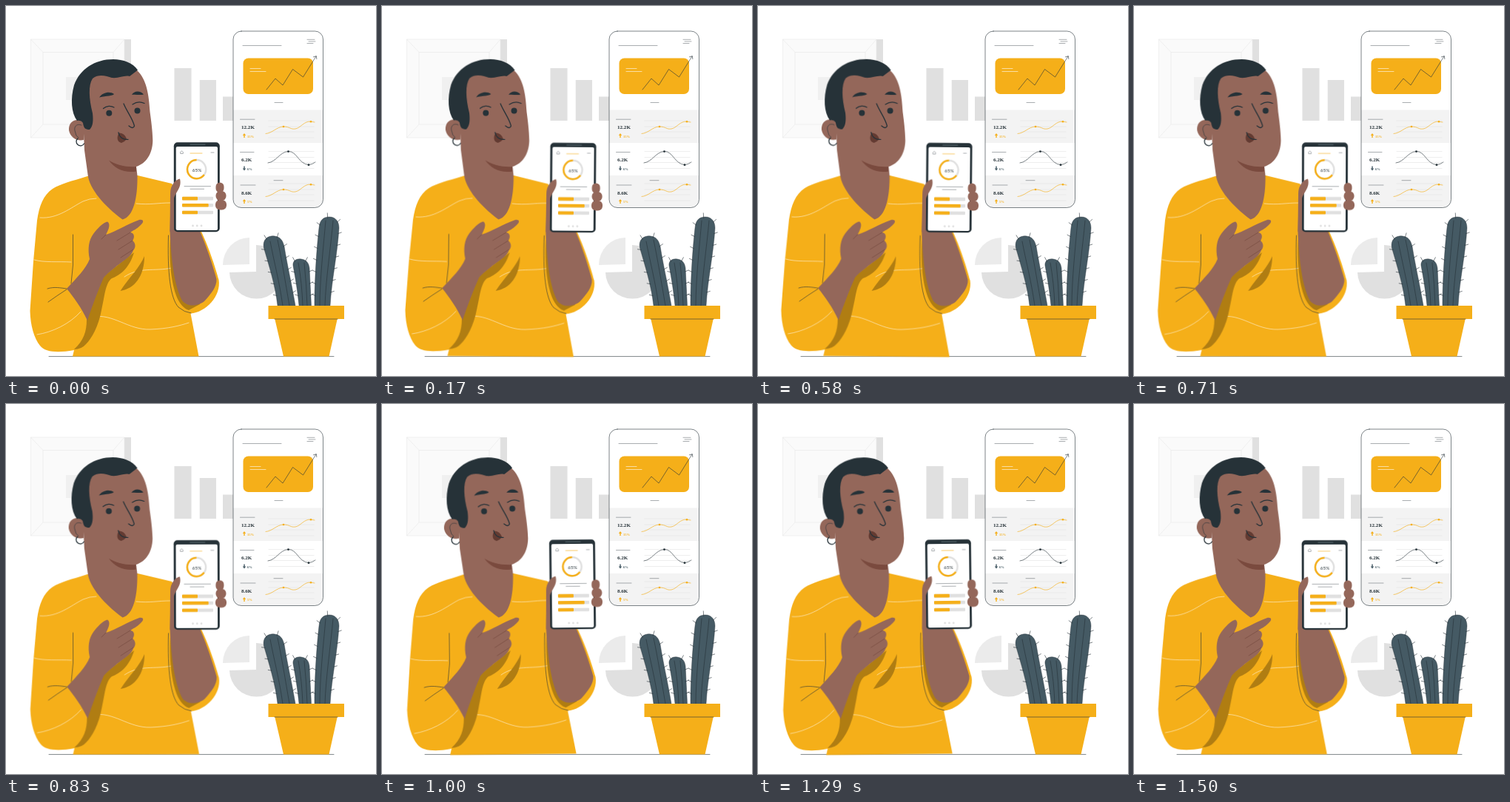
Write an HTML page that moves like this. It is 500 px wide and 500 px high and loops after 1540 ms.

```html
<!DOCTYPE html>
<html lang="en">
<head>
<meta charset="utf-8">
<title>Analytics on a phone</title>
<style>
html, body { margin: 0; width: 100%; height: 100%; overflow: hidden; background: #fff; }
svg { display: block; width: 100vw; height: 100vh; }
.person { transform-origin: 165.5px 273px; animation: sway 1.54s linear infinite; }
@keyframes sway {
  0%, 100% { transform: rotate(0deg); }
  25% { transform: rotate(1deg); }
  75% { transform: rotate(-1deg); }
}
.line { fill: none; stroke-linecap: round; stroke-linejoin: round; }
.ink { fill: #263238; }
.inkLine { stroke: #263238; stroke-width: .6; }
.fine { stroke-width: .4; }
.bold { stroke-width: 1.3; }
.gold { fill: #f5af19; }
.goldLine { stroke: #f5af19; stroke-width: .65; }
.shade { fill: #b07d12; }
.skin { fill: #94675a; }
.grey { fill: #e0e0e0; }
.cactus { fill: #455a64; stroke: #263238; stroke-width: .4; }
.stat { font: bold 7.1px "Liberation Serif", serif; fill: #263238; }
.pct { font: bold 4.5px "Liberation Serif", serif; }
.ring { fill: none; stroke-width: 2.5; }
</style>
</head>
<body>
<svg viewBox="0 0 500 500">
  <defs>
    <clipPath id="card"><rect x="307" y="34" width="121.5" height="238.5" rx="11"/></clipPath>
    <path id="grid" class="line" stroke="#dcdcdc" stroke-width=".5" d="M355 155H416M355 163H416M355 170H416M355 178H416"/>
    <g id="trend">
      <use href="#grid"/>
      <path class="line goldLine" d="M351 172.500C360 172 366 163 375 163S384 167 391 166S403 155 412 156.200L417 157"/>
      <g class="gold"><circle cx="375" cy="163" r="1.300"/><circle cx="412" cy="156.200" r="1.300"/></g>
    </g>
    <path id="arrow" d="M-.7 3V0H-2.200L0-3L2.200 0H.7V3Z"/>
    <rect id="bar" class="grey" x="238" width="42" height="4.600" rx="1"/>
  </defs>

  <!-- wall -->
  <g stroke="#e8e8e8" stroke-width=".6">
    <rect x="160" y="45" width="9" height="133" fill="#e0e0e0" stroke="none"/>
    <rect x="33.500" y="45" width="126.500" height="133" fill="#fafafa"/>
    <rect x="50" y="62.500" width="95" height="97.500" fill="#fafafa"/>
    <path d="M33.500 45L50 62.500M160 45L145 62.500M33.500 178L50 160M160 178L145 160"/>
    <rect x="81" y="96" width="32" height="31" fill="#f0f0f0" stroke="none"/>
  </g>
  <path class="grey" d="M227.500 84H250.500V155H227.500ZM261.700 100H284V155H261.700ZM293 122.500H315V155H293Z"/>
  <path fill="#ebebeb" d="M329 313A36 37 0 0 0 293 350L329 349Z"/>
  <path class="grey" d="M338 323A36.300 36.300 0 1 1 302 360L338 359Z"/>

  <!-- report screen -->
  <g clip-path="url(#card)">
    <rect x="307" y="34" width="122" height="239" fill="#fff"/>
    <path fill="#f3f3f3" d="M307 140.500H429V185H307ZM307 229H429V273H307Z"/>
  </g>
  <rect class="line inkLine" x="307" y="34" width="121.500" height="238.500" rx="11"/>
  <path class="line inkLine fine" d="M320 53.500H372M407 45.300H417M409 47.900H418M407 50.500H415M363 130.500H374M316.500 153.200H336M316.500 197.500H335M317 242H337M362 235.700H374"/>
  <rect class="gold" x="320.500" y="70.500" width="94.500" height="48.500" rx="7"/>
  <path class="line" stroke="#fff" stroke-width=".6" d="M330 84.500H344M330 88.500H351"/>
  <path class="line inkLine" d="M352 113L364 98L374 107L387.500 85.500L401.500 96L419 68M415.500 68.800L419.300 67.700L419.800 71.500"/>
  <use href="#trend"/>
  <use href="#trend" y="85"/>
  <use href="#grid" y="41.500"/>
  <path class="line inkLine" d="M354 212C365 211 370 197 381.500 196.500S395 213 409 214.700Q414 214 418 211"/>
  <g class="ink"><circle cx="381.500" cy="196.600" r="1.400"/><circle cx="409" cy="214.700" r="1.400"/></g>
  <g class="stat"><text x="318" y="166">12.2K</text><text x="318" y="210">6.2K</text><text x="318" y="255">8.6K</text></g>
  <g class="gold pct">
    <use href="#arrow" x="322" y="175"/><text x="326" y="178">15%</text>
    <use href="#arrow" x="322" y="264"/><text x="326" y="266.300">5%</text>
  </g>
  <g class="pct" fill="#455a64">
    <use href="#arrow" transform="translate(322 219.500) scale(1 -1)"/><text x="326" y="222">6%</text>
  </g>

  <path class="line inkLine" d="M58 473.600H443"/>

  <!-- plant -->
  <g id="plant">
    <path class="cactus" d="M367 405C364 377 355 350 348.500 327C346 313 357 310 363 311C371 312 374 317 376 325C380 350 386 375 391 405"/>
    <path class="cactus" d="M396 405C394 385 391 367 388 351C387 344 393 341 399 342C406 343 409 347 410 354L412.500 405"/>
    <path class="cactus" d="M417 405C417 370 420 325 423 300C424 288 430 285 437 285C446 285 450 292 450 300C448 335 440 370 438 405"/>
  </g>
  <path class="line inkLine" d="M374 405C369 370 362 345 357 318M383 405C377 370 373 345 367 316M401 405Q400 375 395 347M407 405Q406 375 403 347M424 405C424 370 429 325 432 290M431 405C432 370 439 325 442 290"/>
  <path class="line inkLine" id="spines"/>
  <path class="gold" d="M354.500 405H457V423H447.700L436.500 473.600H375L363.300 423H354.500Z"/>
  <path class="line inkLine" d="M363 423H448"/>

  <g class="person">
    <!-- shirt -->
    <path class="gold" d="M110 230C88 237 74 240 63 247C50 256 45 270 42 290L37 345L32.500 412C33 432 38 449 46 459C53 468 70 469 92 465L90 473.600H260.500L249.500 415.500C270 414 291 392 287.500 370C283 353 273 323 263 303L224 240L178 229Z"/>
    <path class="line" stroke="#fff" stroke-opacity=".75" stroke-width=".7" d="M46 286C70 288 88 272 104 264Q113 260 122 260M176 267C195 269 205 266 222 266M38 343C52 347 70 345 88 346M160 366C180 352 200 359 224 354M42 444C62 441 86 430 101 413M117 420C145 415 165 438 195 437C220 436 235 432 247 428"/>
    <path class="shade" d="M131 366L173 333C167 354 154 364 143 368C134 374 133 395 129 411C125 433 116 449 108 457Q102 464 92 464C105 452 109 440 109 424ZM187 338C181 353 168 365 154.500 385C174 382 187 365 187 338Z"/>
    <path class="line inkLine" d="M90.500 309V350L88 375M56 382C65 379 74 381 82 382M57 400Q68 392 82 383"/>

    <!-- raised arm -->
    <path class="shade" d="M222 315C220 350 224 404 247 411L262 403L240 330Z"/>
    <path class="skin" d="M223 245L221.500 304C223 345 228 380 238 398C246 408 260 405 268 399C278 388 285 379 284.500 369C279 349 270 322 261 302Z"/>
    <path class="line inkLine" d="M219.500 310C218 360 222 395 233 407Q241 414 250 415"/>

    <!-- phone -->
    <rect class="ink" x="226.800" y="184.300" width="62" height="121" rx="5"/>
    <rect x="229.700" y="190" width="56.300" height="113" rx="2" fill="#fff"/>
    <path class="line" stroke="#64757d" stroke-width=".8" d="M249 187.200H269"/>
    <path class="line goldLine" d="M249 199H265"/>
    <path class="line inkLine fine" d="M277 198H281M241 243.600H276.500M249 247.300H267.500M235.700 199V197.500L237.500 195.700L239.300 197.500V199Z"/>
    <g transform="translate(257.600 220.700) rotate(-90)">
      <circle class="ring" r="12.600" stroke="#e0e0e0"/>
      <circle class="ring" r="12.600" stroke="#f5af19" pathLength="100" stroke-dasharray="0 35 65"/>
    </g>
    <text x="258" y="223.600" text-anchor="middle" font-family="Lato, sans-serif" font-size="6.400" fill="#263238">65%</text>
    <use href="#bar" y="257.800"/><use href="#bar" y="267"/><use href="#bar" y="276.700"/>
    <g class="gold">
      <rect x="238" y="257.800" width="21" height="4.600" rx="1"/>
      <rect x="238" y="267" width="35.700" height="4.600" rx="1"/>
      <rect x="238" y="276.700" width="21" height="4.600" rx="1"/>
    </g>
    <g class="grey"><circle cx="252.500" cy="297" r="1.400"/><circle cx="258.200" cy="297" r="1.400"/><circle cx="264" cy="297" r="1.400"/></g>
    <g class="skin">
      <path d="M235 233.500C228 235 222 243 222 254L221.500 305H227L227 260C229 251 238 246 235 233.500Z"/>
      <rect x="283.500" y="238.500" width="11" height="13.500" rx="5.500"/>
      <rect x="283.500" y="250" width="14" height="13" rx="6"/>
      <rect x="283" y="262" width="15" height="13.500" rx="6"/>
      <rect x="287" y="244" width="6" height="24"/>
    </g>

    <!-- pointing hand -->
    <path class="skin" d="M82 382C95 368 108 355 113 342C110 328 112 316 118 308C124 300 131 293 137 291.500C141 294 140 300 135 309C148 305 165 294 180 289C186 288 187 292 182 296C176 302 172 303 168 306C174 307 174 313 171 317C175 320 176 326 172 330C170 338 160 343 150 351C142 358 136 362 132 367C124 385 117 404 110 425C102 408 92 394 82 382Z"/>
    <path class="line" stroke="#683f35" stroke-width=".5" d="M150 317L168 306M152 329L171 317M155 340L172 329M135 309L129 315"/>

    <!-- head -->
    <path class="skin" d="M104 150L106 195L111 231C115 252 140 276 157.500 288.500C172 285 178 260 177.500 229L176 217C189 213 198 200 198.300 182C198 168 196 154 194.500 143C193 119 190 99 177 87L150 88L115 95Z"/>
    <path fill="#7a4a3e" d="M139 208.500C149 215 163 218 176 217V223.500C160 226 147 220 139 208.500Z"/>
    <path class="skin" d="M105 157C95 150 84 156 85 168C87 178 96 183 105 181Z"/>
    <path class="line inkLine" d="M102 161C95 158 91 164 93.500 170Q94 176 98 178"/>
    <path class="line inkLine bold" d="M97 179A5.600 5.600 0 1 0 105.500 186"/>
    <path class="ink" d="M178 86.500C172 77 158 72 145 72C120 72 100 85 92 107C87 125 88 144 96 155Q101 154 104 158C105 165 107 167 113 167C118 162 118 154 117 145C112 125 111 107 117 98C126 91 136 95 143 97C153 98 160 93 167 95C171 92 175 89 178 86.500Z"/>
    <path class="ink" d="M126 123.500C131 116 141 115 146 119C144 122 136 121 126 123.500ZM170 120C173 114 182 114 186 119.500C181 121 175 119 170 120Z"/>
    <path class="line inkLine bold" d="M131.500 138.500C136 134.500 142 134.500 146 137M171 133C176 129.500 182 129 187 131.500"/>
    <circle class="ink" cx="139.300" cy="144.700" r="4"/><circle class="ink" cx="177.500" cy="141.500" r="4"/>
    <path class="line inkLine bold" d="M159 132C163 142 171 152 173.500 162Q172 167 166 162"/>
    <path fill="#633b32" d="M153 171.500C149 177 150 184 156 185Q160 184 163 180C162 175 158 172 153 171.500Z"/>
    <path class="line inkLine bold" d="M152 171C153 177 158 181 165 180.300"/>
  </g>
</svg>
<script>
// Spines: short upward ticks, evenly spaced along each cactus edge.
const ticks = [];
for (const edge of document.querySelectorAll('#plant path')) {
  const len = edge.getTotalLength();
  for (let s = 14; s < len - 8; s += 16) {
    const p = edge.getPointAtLength(s), q = edge.getPointAtLength(s + 1);
    const nx = q.y - p.y, ny = p.x - q.x;
    ticks.push(`M${p.x - nx} ${p.y - ny + .5}L${p.x + nx * 3.8} ${p.y + ny * 3.8 - 1.5}`);
  }
}
document.getElementById('spines').setAttribute('d', ticks.join(''));
</script>
</body>
</html>
```
